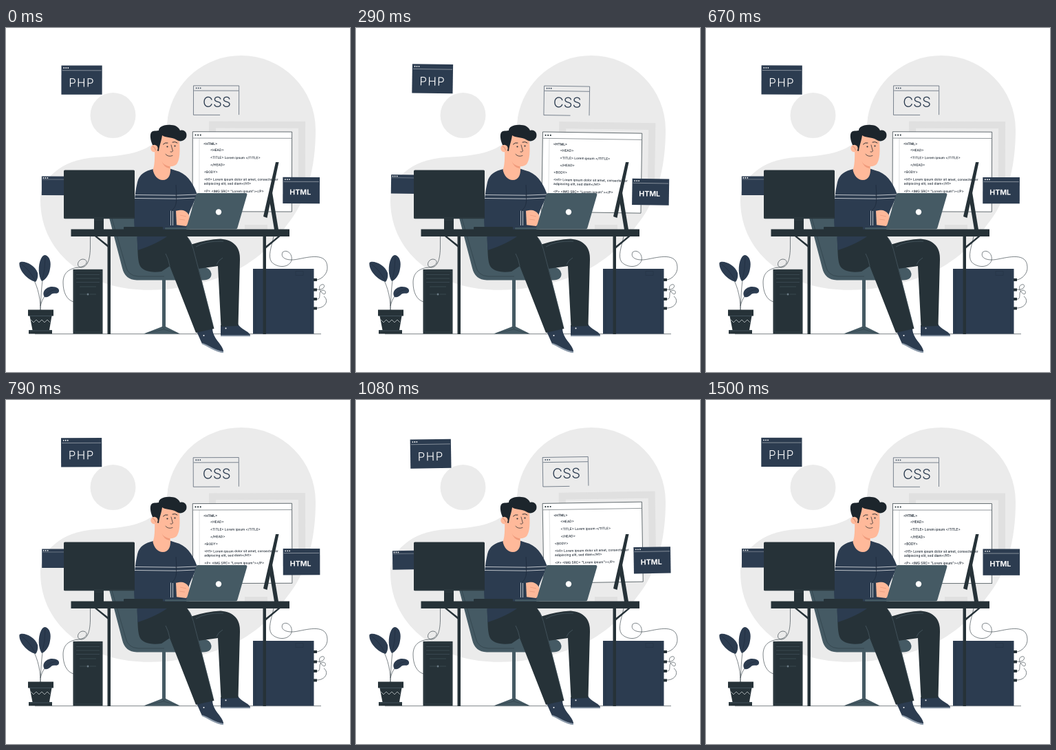
Recreate the animation shown at these times as an HTML page. Size 500 by 500 pixels, loop 1540 ms.

```html
<!DOCTYPE html>
<html lang="en">
<head>
<meta charset="utf-8">
<title>Developer at a desk</title>
<style>
  html, body { margin: 0; height: 100%; overflow: hidden; background: #fff; }
  svg { display: block; width: 100vw; height: 100vh; }
  text { font-family: Inter, "Open Sans", sans-serif; }
  .navy { fill: #2c3c50; }
  .dark { fill: #263238; }
  .slate { fill: #455a64; }
  .skin { fill: #ffb99a; }
  .wire { fill: none; stroke: #263238; stroke-width: .6; }
  .light { fill: none; stroke: #fff; stroke-width: .7; }
  .seam { fill: none; stroke: #53656f; stroke-width: .6; }
  .code { font-size: 4.78px; font-weight: 500; fill: #1b2530; }
</style>
</head>
<body>
<svg viewBox="0 0 500 500">
  <defs>
    <g id="dots"><circle r=".9"/><circle cx="3" r=".9"/><circle cx="6" r=".9"/></g>
  </defs>

  <!-- backdrop -->
  <g fill="#ebebeb">
    <path d="M342 40A108 108 0 0 1 450 148C450 205 437 252 407 288C382 324 347 352 300 366C260 378 225 383 190 380C130 377 50 335 50 250C50 222 78 191 130 188C175 186 202 180 217 165C232 150 235 139 235 130A108 108 0 0 1 342 40Z"/>
    <circle cx="155.5" cy="127" r="33"/>
  </g>

  <!-- swaying windows -->
  <g id="windows">
    <path d="M300 140.500H430V247H300Z" fill="none" stroke="#e0e0e0" stroke-width="10"/>
    <rect class="navy" x="80.300" y="54.800" width="59.200" height="42.200"/>
    <path class="light" d="M81.500 62H138.500" opacity=".6"/>
    <use href="#dots" x="84" y="58.300" fill="#fff"/>
    <text x="91" y="85.800" font-size="17" font-weight="350" letter-spacing="1.300" fill="#fff">PHP</text>

    <rect class="navy" x="52" y="216" width="60" height="27.500"/>
    <path class="light" d="M53 220.500H110" opacity=".4"/>
    <use href="#dots" x="54.500" y="218.300" fill="#fff"/>

    <path d="M272.400 83.800H338.500V126M311 126.300H272.400V83.800M273 91H338" fill="none" stroke="#2c3c50" stroke-width=".6"/>
    <use href="#dots" x="276.500" y="87.300" class="navy"/>
    <text x="286" y="114.700" font-size="20.500" font-weight="300" class="navy">CSS</text>

    <rect x="271.300" y="150.700" width="144.300" height="116" fill="#fff" stroke="#263238" stroke-width=".7"/>
    <path d="M272 160H415" stroke="#263238" stroke-width=".5"/>
    <path d="M281 160V250" stroke="#263238" stroke-width=".3" opacity=".5"/>
    <use href="#dots" class="dark" transform="translate(275.500 155.500) scale(1.2)"/>
    <g class="code">
      <text x="287" y="170" font-weight="600">&lt;HTML&gt;</text>
      <text x="297" y="179">&lt;HEAD&gt;</text>
      <text x="297" y="190">&lt;TITLE&gt; Lorem ipsum &lt;/TITLE&gt;</text>
      <text x="297" y="200.500">&lt;/HEAD&gt;</text>
      <text x="288" y="211">&lt;BODY&gt;</text>
      <text x="288" y="221.600">&lt;H1&gt; Lorem ipsum dolor sit amet, consectetuer</text>
      <text x="288" y="227.600">adipiscing elit, sed diam&lt;/H1&gt;</text>
      <text x="288" y="238.800">&lt;P&gt; &lt;IMG SRC= "Lorem ipsum"&gt;&lt;/P&gt;</text>
    </g>

    <rect class="navy" x="402.500" y="216.500" width="53.600" height="38.300"/>
    <path class="light" d="M403.500 223H455" opacity=".6"/>
    <use href="#dots" x="406" y="219.800" fill="#fff"/>
    <text x="412.500" y="242" font-size="10.600" font-weight="700" fill="#fff">HTML</text>
  </g>

  <!-- floor and computers -->
  <path class="wire" d="M42 444.700H458"/>
  <rect x="347" y="286" width="33" height="7" fill="#e0e0e0"/>
  <path class="wire" d="M122.500 303V320C122 338 118 347 110 348C101 348 104 336 112 336C121 337 118 347 105 348C88 350 83 359 83 370C83 384 88 395 98 398"/>
  <rect class="dark" x="97.500" y="350.800" width="43" height="93.700"/>
  <path class="seam" d="M102 358.500H136M102 364H136M102 369.500H136M107 387H117M122 387H131M107 376H131" opacity=".7"/>
  <path class="seam" d="M99.500 353V442H138.500V353Z" opacity=".4"/>
  <circle cx="119" cy="387" r="1.500" fill="#6b7c86"/>
  <rect class="navy" x="359" y="350" width="88.500" height="94.500"/>
  <path d="M363 350V444M443 350V444M421 353.500H432V359.500H421Z" fill="none" stroke="#233142" stroke-width=".5"/>
  <path class="wire" d="M389 303C386 318 380 332 386 340C394 349 411 349 415 338C417 328 408 321 402 326C398 335 410 339 424 336C440 333 466 326 467 347C468 357 459 365 452 366M452 380C464 382 465 371 459 373C450 376 461 390 464 386C466 380 457 379 456 386C456 393 455 394 452 394M452 407C464 407 470 396 462 390"/>
  <path class="dark" d="M447 364h5v4h-5zM447 378.500h5v4h-5zM447 392h5v4h-5zM447 405.500h5v4h-5z"/>

  <!-- plant -->
  <path class="wire" d="M50 410C50 388 45 372 33 352M50 410C51 385 52 368 57 340M50 404C53 393 57 386 67 383"/>
  <g class="navy">
    <path d="M19.500 341C25 337 42 344 46 356C47 362 45 367 43 369C31 366 18 352 19.500 341Z"/>
    <path d="M57 330C64 332 66 341 64 350C63 358 58 366 52 368C47 361 46 345 51 335C53 331 55 330 57 330Z"/>
    <path d="M56 391C51 383 59 376 67 376C74 376 78 379 77 383C75 388 70 384 66 387C63 390 60 392 56 391Z"/>
  </g>
  <path d="M21 342Q34 351 42 367M57 333Q57 350 53 366M57 389Q62 382 73 380" fill="none" stroke="#1f2b3b" stroke-width=".6"/>
  <path class="dark" d="M32 409.500H69V418.500H66.500L63 439H67V444.500H33V439H38.500L34.500 418.500H32Z"/>
  <path class="seam" d="M34 418.500H67M33 440H67"/>
  <path d="M36 424l4 4 4-4 4 4 4-4 4 4 4-4 4 4" fill="none" stroke="#c3c9cc" stroke-width=".8"/>

  <!-- chair -->
  <g class="slate">
    <path d="M149 272L169 349Q173 366 190 366.500H287Q299 366 298.500 357Q297 348 285 347L197 345L186 272Z"/>
    <path d="M227 366H232V434L253 444.500H200L227 434Z"/>
  </g>
  <path d="M154 277L174 346Q177 360 192 361H230M227 434L229.500 437L232 434M203 444L229 438L250 444" fill="none" stroke="#2d3d46" stroke-width=".6"/>

  <!-- legs and shoes -->
  <path class="navy" d="M312 432L337 430C341 438 352 440 355 446V448H312Z"/>
  <path d="M312 446.500H355V448.300H312Z" fill="#8d9bab"/>
  <path class="dark" d="M268 315Q292 307 312 306.500C331 308 341 319 340 337L337.500 433L312.500 434L308 346L265 352Z"/>
  <path class="navy" d="M277 441L300 436C300 451 314 459 316 469V472C303 470 294 462 285 459Z"/>
  <path d="M284.500 457.500C296 461 304 469 316 470V472.300C303 471 294 463 285 459.500Z" fill="#8d9bab"/>
  <circle cx="319.500" cy="436.500" r="1" fill="#fff"/>
  <circle cx="287.500" cy="447" r="1" fill="#fff"/>
  <path class="dark" d="M192 300C191 318 191 335 194 344C198 354 212 356 226 354L238 346L276 443L302.500 437L273 322Q269 307 260 300Z"/>
  <path class="navy" d="M190 300H238Q222 313 191.500 323Z"/>
  <path class="seam" d="M265 306Q271 314 274 328L301 432M238 346Q236 335 232 328M276 318Q290 309 316 310M306 344Q308 338 315 334"/>

  <!-- torso -->
  <path class="navy" d="M214 205C202 208 194 212 191 224C186 245 185 270 187 295H262L266 270C270 258 277 247 277.500 241C271 223 262 211 246 207L237 204Z"/>
  <path class="light" d="M187.500 242.500L247 243.200L277 242M186.500 247.500L247 248.200L274.500 247"/>
  <path d="M247 242C249 255 246 261 241 265M247 228L248 246" fill="none" stroke="#1e2a3b" stroke-width=".8"/>
  <path class="skin" d="M246 266L251 265C256 264 262 265 266 272L267 280L262 288L246 286Z"/>
  <path d="M253 272L262 274M252 278L260 279" stroke="#e39375" stroke-width=".6"/>
  <path class="navy" d="M237 265L247 266L248 287H237Z"/>
  <path class="light" d="M239.500 265.500V287M242.500 266V287"/>

  <!-- head -->
  <path class="skin" d="M216 174H238L239 206C239 214 236 221 228 221C220 221 215 214 213.500 206C216 200 216.500 190 216 174Z"/>
  <path d="M226 192Q231 200 238 201V204Q229 203 226 192Z" fill="#f09b7c"/>
  <path class="skin" d="M220 152H250L252 164C253 178 253 191 248 198C243 203 232 202 227 195L220 184Z"/>
  <path fill="#1c252c" d="M219 178C212 172 209 160 210 155C211 148 217 150 222 149C222 143 231 140 240 141C248 141 252 146 253 149C260 147 264 153 262 159C259 165 252 166 247 162C240 158 232 160 227 156C226 164 223 170 222 179Z"/>
  <circle cx="215.500" cy="175" r="5.200" class="skin"/>
  <path d="M213 172Q217 173 217.500 178" fill="none" stroke="#c9745a" stroke-width=".7"/>
  <g fill="none" stroke="#1c252c" stroke-width=".9" stroke-linecap="round">
    <path d="M228.500 169Q231 166 235 167M242 166Q246 164.500 249 167"/>
    <path d="M240 170L242.500 179Q241 181 239 180M232 183.500Q236 188 242 185.500" stroke-width=".7"/>
  </g>
  <circle cx="234.500" cy="172.500" r="1.100" class="dark"/>
  <circle cx="245.500" cy="171.500" r="1.100" class="dark"/>

  <!-- desk and screens -->
  <g class="dark">
    <rect x="84" y="206.500" width="103" height="70.800" rx="1.500"/>
    <path d="M128 277H142V293H128Z"/>
    <rect x="171" y="289" width="57" height="4" rx="1"/>
    <path d="M392 195H396.500L379.500 276L374 274Z"/>
    <path d="M382.500 248L386.500 236L396 293H390Z"/>
    <path d="M94.500 292.500H412V303H94.500Z"/>
    <path d="M147.500 303H152V445H147.500ZM373.500 303H378V445H373.500Z"/>
    <path d="M129 303H132.500L149 316V319.500ZM395 303H398.500L377 321V317.500Z"/>
  </g>
  <path class="seam" d="M85 276H186M128 279H142" opacity=".4"/>
  <rect class="slate" x="231" y="290" width="36" height="2.600" rx="1"/>
  <path class="slate" d="M279 240H348.500Q351 240 350.200 243L336.500 290Q336 292.500 333 292.500H261.500L276.500 242Q277 240 279 240Z"/>
  <circle cx="309" cy="267.500" r="4.200" fill="#fff"/>
</svg>
<script>
  const LOOP = 1540, STEPS = 37;
  const windows = document.getElementById('windows');

  // Linear swing: 0 → 1° → -1° → 0 over one loop
  const swing = p => p < .25 ? 4 * p : p < .75 ? 2 - 4 * p : 4 * p - 4;

  function draw(now) {
    const step = Math.floor((now + 5) % LOOP / LOOP * STEPS);
    const angle = swing((step + 1) % STEPS / STEPS);
    windows.setAttribute('transform', `rotate(${angle} 254 161)`);
    requestAnimationFrame(draw);
  }
  draw(performance.now());
</script>
</body>
</html>
```
